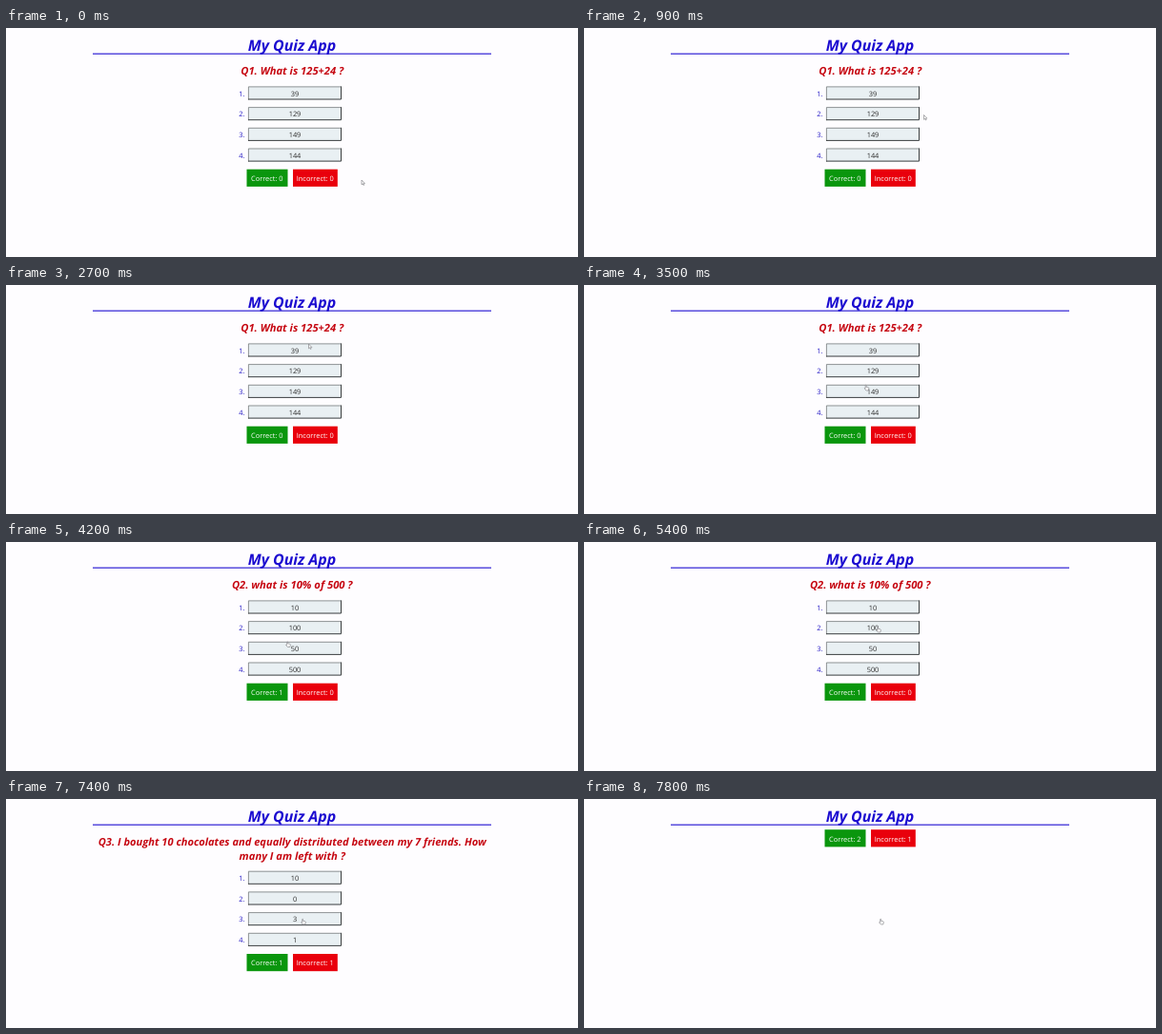
Recreate the animation shown at these times as an HTML page. Size 600 by 241 pixels, loop 8 s.

```html
<!DOCTYPE html>
<html lang="en">
<head>
<meta charset="utf-8">
<title>My Quiz App</title>
<style>
  html, body { margin: 0; width: 100%; height: 100%; overflow: hidden; background: #fefdff; }
  svg { display: block; width: 600px; height: 241px; }
  text { font: 7.4px "Open Sans", "Noto Sans", sans-serif; text-anchor: middle; text-rendering: geometricPrecision; }
  .title { font-size: 15.9px; font-weight: 700; font-style: italic; fill: #1b0bd0; }
  .ask { font-size: 11.2px; font-weight: 700; font-style: italic; fill: #c60812; }
  .num { fill: #2418c4; text-anchor: end; }
  .answer { fill: #2b2b2b; }
  .score { fill: #fff; }
</style>
</head>
<body>
<svg id="stage" viewBox="0 0 600 241"></svg>
<script>
const LOOP = 8000, STEP = 100;

const scenes = [
  { at: 0, ask: ["Q1. What is 125+24 ?"], answers: [39, 129, 149, 144], right: 0, wrong: 0 },
  { at: 3600, ask: ["Q2. what is 10% of 500 ?"], answers: [10, 100, 50, 500], right: 1, wrong: 0 },
  { at: 5500, ask: ["Q3. I bought 10 chocolates and equally distributed between my 7 friends. How",
                     "many I am left with ?"], answers: [10, 0, 3, 1], right: 1, wrong: 1, size: 11.08 },
  { at: 7800, ask: [], answers: [], right: 2, wrong: 1 }
];

// Pointer path: time, x, y
const path = [
  [0, 373, 160], [500, 449, 92], [900, 356.5, 91.5], [1300, 366, 72],
  [1800, 345, 52], [2200, 326, 50], [2700, 317.5, 62], [3200, 303, 92],
  [3500, 294, 105], [3800, 294, 105], [4200, 293.5, 104.5], [4700, 300, 98],
  [5000, 306.5, 89], [5600, 306.5, 89], [6400, 311, 107],
  [7000, 311, 119], [7400, 309.5, 126], [8000, 309.5, 126]
];
const HAND_FROM = 2800;

const stage = document.getElementById("stage");

function add(parent, tag, attrs, text) {
  const el = document.createElementNS("http://www.w3.org/2000/svg", tag);
  for (const key in attrs) el.setAttribute(key, attrs[key]);
  if (text !== undefined) el.textContent = text;
  parent.append(el);
  return el;
}

function label(parent, cls, x, y, text) {
  return add(parent, "text", { class: cls, x, y }, text);
}

function option(parent, y, index, value) {
  label(parent, "num", 250.4, y + 10.1, index + 1 + ".");
  add(parent, "rect", { x: 254, y, width: 98, height: 14, fill: "#e9f0f3" });
  add(parent, "path", { d: `M254.4 ${y + 14}V${y + .4}H352`, fill: "none", stroke: "#777b7d", "stroke-width": .8 });
  add(parent, "path", { d: `M254 ${y + 13.5}H351.5V${y}`, fill: "none", stroke: "#3c3f40" });
  label(parent, "answer", 303, y + 10.1, value);
}

function badge(parent, x, y, width, fill, text) {
  add(parent, "rect", { x, y, width, height: 18.2, fill });
  label(parent, "score", x + width / 2 - .2, y + 12.3, text);
}

function buildScene({ ask, answers, right, wrong, size }) {
  const g = add(stage, "g");
  ask.forEach((line, i) => {
    const el = label(g, "ask", 300.2, 49.2 + i * 14.3, line);
    if (size && i === 0) el.style.fontSize = size + "px";
  });
  const shift = ask.length > 1 ? 14.3 : 0;
  answers.forEach((value, i) => option(g, 61.5 + shift + i * 21.7, i, value));
  const top = answers.length ? 148.7 + shift : 32.2;
  badge(g, 252.5, top, 43, "#0a960d", "Correct: " + right);
  badge(g, 301, top, 46.8, "#e9000c", "Incorrect: " + wrong);
  return g;
}

label(stage, "title", 300, 23.6, "My Quiz App");
add(stage, "rect", { x: 91, y: 26.6, width: 418, height: 1.1, fill: "#1b0bd0" });
const groups = scenes.map(buildScene);

const pointer = add(stage, "g", { fill: "#fff", stroke: "#77777c", "stroke-width": .6, "stroke-linejoin": "round" });
const arrow = add(pointer, "path", { d: "M0 0V4.8L1.1 3.9 1.9 5.5 2.6 5.2 1.9 3.6H3.4Z" });
const hand = add(pointer, "path", {
  d: "M1.2 .5Q1.7-.1 2.1 .5V2.3L4.3 2.8Q5 3 4.8 3.8L4.3 6H1.9L.1 3.8Q.3 3.2 1.2 3.8Z"
});

function position(t) {
  const i = path.findIndex(p => p[0] > t);
  const [t0, x0, y0] = path[i - 1], [t1, x1, y1] = path[i];
  const u = (t - t0) / (t1 - t0), k = u * u * (3 - 2 * u);
  return [x0 + (x1 - x0) * k, y0 + (y1 - y0) * k];
}

function render(time) {
  const t = Math.floor(time % LOOP / STEP) * STEP;
  const current = scenes.filter(s => s.at <= t).length - 1;
  groups.forEach((g, i) => g.setAttribute("display", i === current ? "inline" : "none"));
  const isHand = t >= HAND_FROM;
  arrow.setAttribute("display", isHand ? "none" : "inline");
  hand.setAttribute("display", isHand ? "inline" : "none");
  pointer.setAttribute("transform", `translate(${position(t)})`);
}

const start = performance.now();
function tick() {
  render(performance.now() - start);
  requestAnimationFrame(tick);
}
tick();
</script>
</body>
</html>
```
